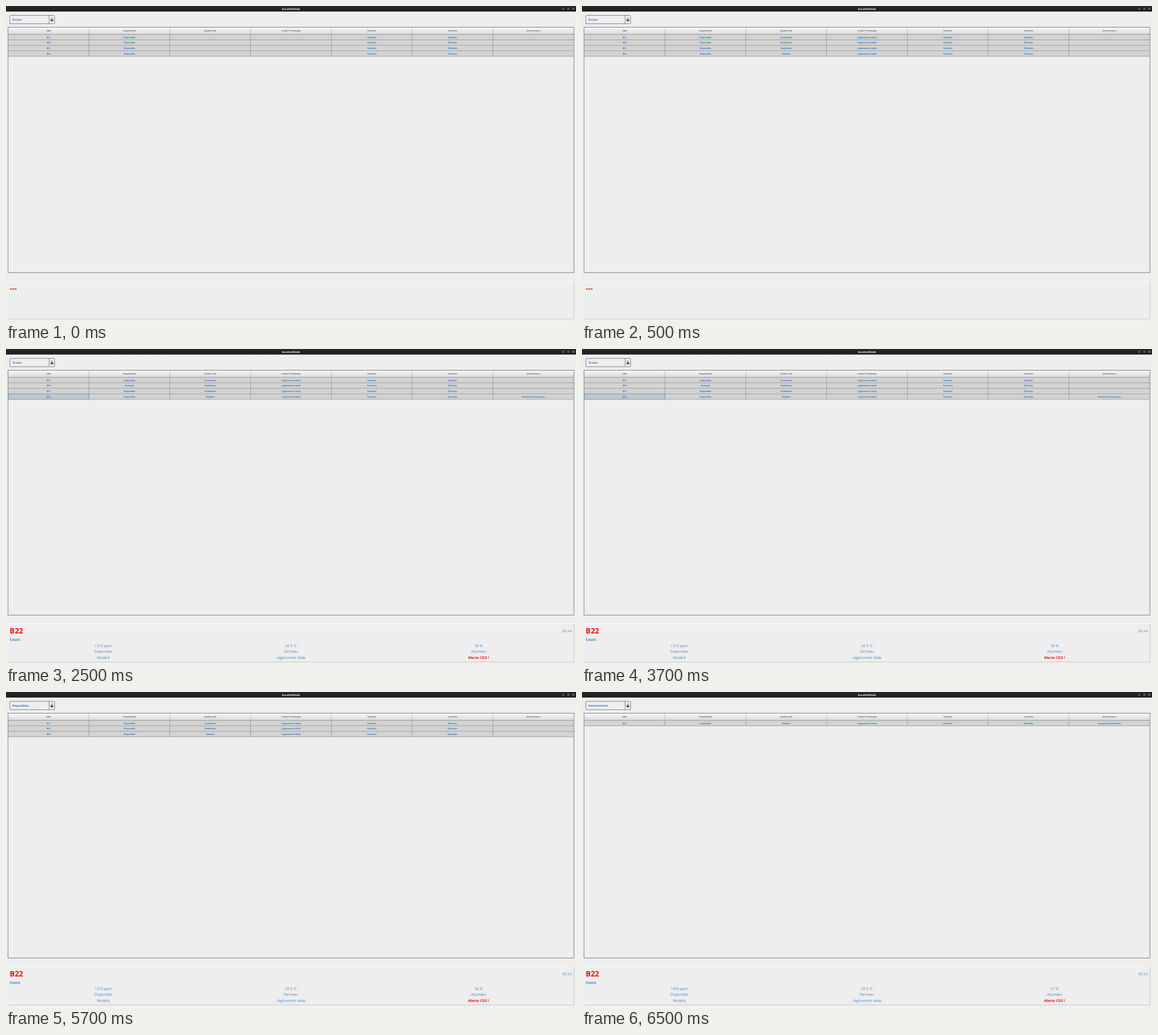
Recreate the animation shown at these times as an HTML page. Size 1006 px wide and 557 px high, loop 8000 ms.

```html
<!DOCTYPE html>
<html lang="fr">
<head>
<meta charset="utf-8">
<title>AuraHallDesk</title>
<style>
  html, body { margin: 0; width: 100%; height: 100%; overflow: hidden; background: #eee; }
  svg { display: block; width: 1006px; height: 557px; }
  text { font-family: "Open Sans", "Noto Sans", sans-serif; text-rendering: geometricPrecision; white-space: pre; }
</style>
</head>
<body>
<svg id="stage" viewBox="0 0 1006 557" xmlns="http://www.w3.org/2000/svg">
  <defs>
    <linearGradient id="bar" x2="0" y2="1">
      <stop stop-color="#282828"/><stop offset="1" stop-color="#1c1c1c"/>
    </linearGradient>
    <linearGradient id="head" x2="0" y2="1">
      <stop stop-color="#f4f4f5"/><stop offset=".4" stop-color="#ececee"/><stop offset="1" stop-color="#d8d8dc"/>
    </linearGradient>
  </defs>
</svg>
<script>
const NS = "http://www.w3.org/2000/svg";
const stage = document.getElementById("stage");
const BLUE = "#2d78c6", SOFT = "#3b82c4", RED = "#f50a0a", GRID = "#929292", EDGE = "#777";
const LEFT = 4, COL = 142.57, TOP = 50.3, ROW = 9.7;
const LOOP = 8000;

function add(parent, tag, attrs) {
  const el = document.createElementNS(NS, tag);
  for (const key in attrs) el.setAttribute(key, attrs[key]);
  parent.appendChild(el);
  return el;
}
const group = () => add(stage, "g", {});
const rect = (g, x, y, width, height, fill, more) => add(g, "rect", { x, y, width, height, fill, ...more });
const path = (g, d, stroke, width = 1) =>
  add(g, "path", { d, stroke, "stroke-width": width, fill: "none" });
function label(g, text, x, y, size, fill, weight = 700, anchor = "middle") {
  add(g, "text", { x, y, fill, "font-size": size, "font-weight": weight, "text-anchor": anchor }).textContent = text;
}

const titles = ["Salle", "Disponibilité", "Qualité d'air", "Confort Thermique", "Fenêtres", "Lumières", "Interventions"];
const WARM = "Légèrement tiède";
const room = (name, air = "Excellente", state = "Disponible", windows = "Fermées", lights = "Éteintes", todo = "") =>
  [name, state, air, air && WARM, windows, lights, todo];
const lit = todo => room("B22", "Modéré", "Disponible", "Fermées", "Allumées", todo);
const TODO = "Eteindre les lumières";

const scenes = [
  { from: 0, filter: "Toutes", rows: ["B11", "B20", "B21", "B22"].map(n => room(n, "")) },
  { from: 500, filter: "Toutes", rows: [room("B11"), room("B20"), room("B21"), room("B22", "Modéré")] },
  { from: 2500, filter: "Toutes", selected: 3, co2: 1312, humidity: 56,
    rows: [room("B11"), room("B20", "Excellente", "Occupée", "Ouvertes"), room("B21"), lit(TODO)] },
  { from: 4500, filter: "Disponibles", co2: 1312, humidity: 56, rows: [room("B11"), room("B21"), lit("")] },
  { from: 6500, filter: "Interventions", co2: 1455, humidity: 57, rows: [lit(TODO)] }
];

const colX = i => LEFT + COL * i;
const midX = i => colX(i + .5);

function drawWindow() {
  const g = group();
  rect(g, 0, 0, 1006, 557, "#eee");
  rect(g, 0, 0, 1006, 9.8, "url(#bar)");
  label(g, "AuraHallDesk", 503, 6.6, 4.7, "#f4f4f4");
  for (const cx of [983.6, 992.4, 1001.2]) add(g, "circle", { cx, cy: 4.8, r: 2.5, fill: "#3c3c3c" });
  path(g, "M982.5 5.3h2.2M991.5 4.9l.9-.9.9.9-.9.9zM1000.2 3.8l2 2m0-2l-2 2", "#c8c8c8", .6);

  rect(g, 6.7, 16.6, 79.1, 14.7, "#eee", { rx: 1.2, stroke: "#777", "stroke-width": .9 });
  path(g, "M76.2 16.6v14.7", "#777", .9);
  path(g, "M81 20.4v6.4M78.2 24.2l2.8 2.8 2.8-2.8", "#222", 1.1);

  rect(g, LEFT, 38, 998, 12.3, "url(#head)");
  titles.forEach((t, i) => {
    label(g, t, midX(i), 45.2, 3.85, "#222", 500);
    if (i) path(g, `M${colX(i)} 38.5V50`, "#a8a8ac", .6);
  });
}

function drawRows(g, { rows, selected }) {
  const bottom = TOP + ROW * rows.length;
  rect(g, LEFT, TOP, 998, bottom - TOP, "#d3d3d3");
  if (selected !== undefined) rect(g, LEFT, TOP + ROW * selected, COL, ROW, "#bcc8d2");
  for (let i = 1; i < titles.length; i++) path(g, `M${colX(i)} ${TOP}V${bottom}`, GRID, .8);
  rows.forEach((cells, r) => {
    const y = TOP + ROW * r;
    path(g, `M${LEFT} ${y + ROW - .2}H1002`, GRID, .8);
    cells.forEach((t, i) => t && label(g, t, midX(i), y + 6.2, 3.85, BLUE));
  });
  if (selected !== undefined) {
    rect(g, LEFT + .3, TOP + ROW * selected + .2, COL - .6, ROW - .6, "none", { stroke: "#8198ae", "stroke-width": .6 });
  }
}

function drawDetails(g, { co2, humidity }) {
  label(g, "B22", 6.6, 503.2, 13.1, RED, 700, "start");
  label(g, "60 m²", 999.2, 500.8, 6.29, SOFT, 400, "end");
  label(g, "Cours", 6.8, 516, 6.29, BLUE, 700, "start");
  const columns = [
    [co2 + " ppm", "Disponible", "Modéré"],
    ["24.5 °C", "Fermées", WARM],
    [humidity + " %", "Allumées"]
  ];
  columns.forEach((lines, c) => lines.forEach((t, i) =>
    label(g, t, 171.6 + 331.3 * c, 526.5 + 10.85 * i, 6.29, SOFT, 400)));
  label(g, "Alerte CO2 !", 834.2, 548.2, 6.29, RED);
}

function drawScene(scene) {
  const g = group();
  const shift = scene.co2 ? -1 : 0;
  label(g, scene.filter, 10.9, 25.9, 5.1, BLUE, 700, "start");
  drawRows(g, scene);
  path(g, `M${LEFT} 50.2H1002`, "#888", .8);
  rect(g, 3.6, 37.5, 998.7, 434 + shift, "none", { stroke: EDGE, "stroke-width": .9 });

  const y = 487 + shift;
  path(g, `M3.5 553V${y}H1002.5`, "#fafafa", .8);
  path(g, `M3.5 553.3H1002.4V${y}`, "#bdbdbd", .8);
  if (scene.co2) drawDetails(g, scene);
  else label(g, "---", 6.6, 504.2, 13.1, RED, 700, "start");
  return g;
}

drawWindow();
const layers = scenes.map(drawScene);

function update(time) {
  const t = time % LOOP;
  const current = scenes.filter(s => s.from <= t).length - 1;
  layers.forEach((g, i) => g.setAttribute("display", i === current ? "inline" : "none"));
}

const start = performance.now();
function tick() {
  update(performance.now() - start);
  requestAnimationFrame(tick);
}
update(0);
requestAnimationFrame(tick);
</script>
</body>
</html>
```
